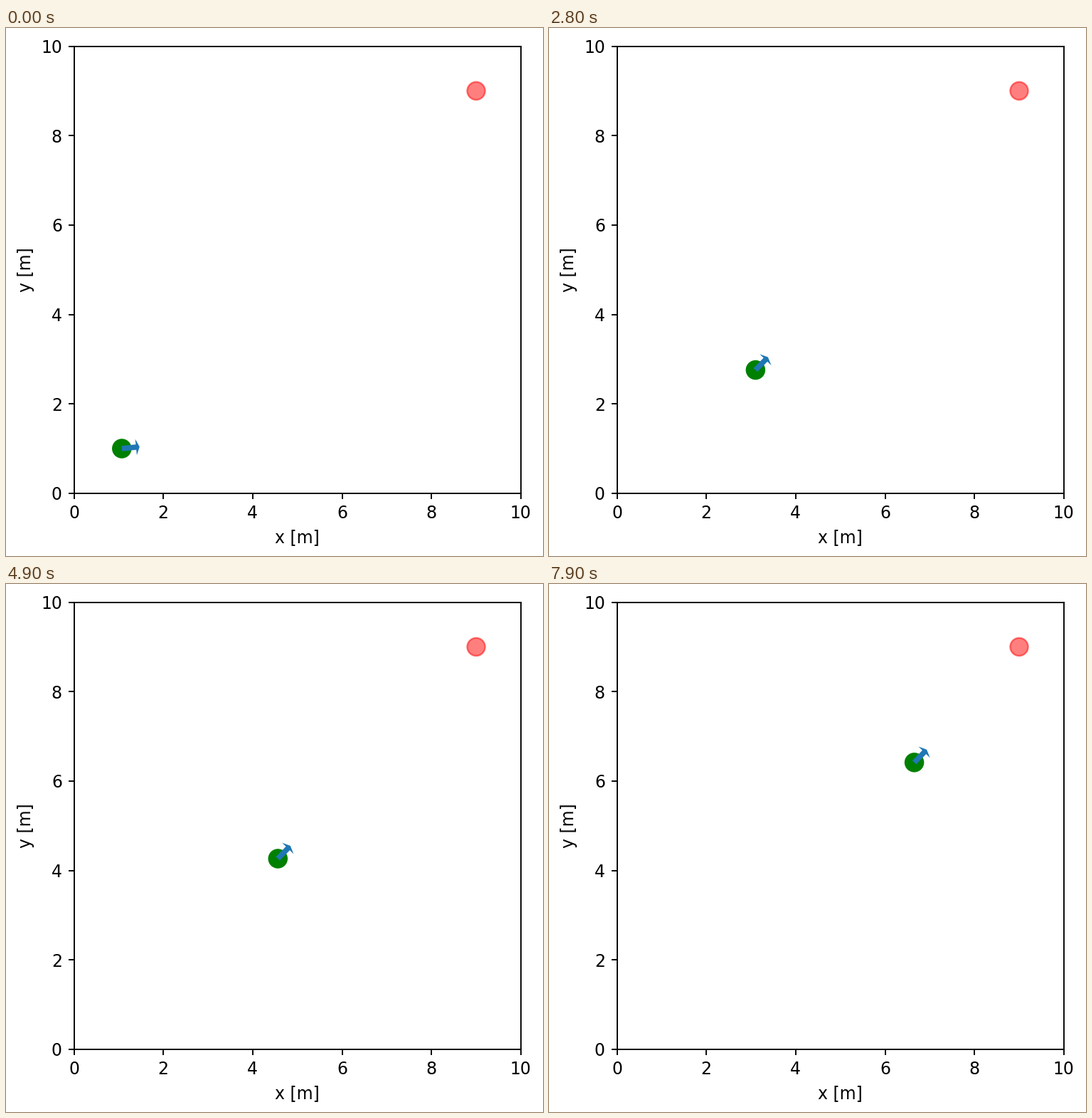
Recreate the animation shown at these times as a matplotlib script. Size 755 px wide and 742 px high, loop 8 s.

```python
import numpy as np
import matplotlib.pyplot as plt
from matplotlib.animation import FuncAnimation
from matplotlib.patches import Circle, Polygon

W, H, DPI = 755, 742, 170
LEFT, BOTTOM, SIDE = 95.52, 653.85, 628.32  # axes box in pixels from the top left
STEPS, DT = 80, 0.1
START, GOAL = (1.0, 1.0, 0.0), (9.0, 9.0)
MAX_V, MAX_W, ANGLE_TOL = 1.0, 1.0, 0.1
RADIUS = 0.2

# Unit arrow along +x, scaled to length 0.4 and width 0.6
ARROW = np.array([
    (0, 0.1), (0, -0.1), (0.8, -0.1), (0.8, -0.3),
    (1, 0), (0.8, 0.3), (0.8, 0.1),
]) * (0.4, 0.6)


def step(x, y, theta):
    """Differential drive robot dashing towards the goal."""
    diff = np.arctan2(GOAL[1] - y, GOAL[0] - x) - theta
    v = MAX_V * np.cos(diff)
    w = 0.0 if abs(diff) < ANGLE_TOL else MAX_W * np.sign(diff)
    return (x + v * np.cos(theta) * DT,
            y + v * np.sin(theta) * DT,
            theta + w * DT)


def simulate():
    states = [step(*START)]
    while len(states) < STEPS:
        states.append(step(*states[-1]))
    return states


def arrow_points(x, y, theta):
    c, s = np.cos(theta), np.sin(theta)
    return ARROW @ np.array([(c, s), (-s, c)]) + (x, y)


path = simulate()

plt.rcParams.update({"font.family": "DejaVu Sans", "font.size": 10})
fig = plt.figure(figsize=((W + 0.01) / DPI, (H + 0.01) / DPI), dpi=DPI,
                 facecolor="white")
ax = fig.add_axes([LEFT / W, (H - BOTTOM) / H, SIDE / W, SIDE / H])
ax.set(xlim=(0, 10), ylim=(0, 10), xlabel="x [m]", ylabel="y [m]")
ax.set_xticks(range(0, 11, 2))
ax.set_yticks(range(0, 11, 2))

goal = ax.add_patch(Circle(GOAL, RADIUS, color="red", alpha=0.5, zorder=1))
robot = ax.add_patch(Circle(path[0][:2], RADIUS, color="green", zorder=2))
arrow = ax.add_patch(Polygon(arrow_points(*path[0]), facecolor="C0",
                             edgecolor="none", linewidth=0, zorder=3))


def update(i):
    x, y, theta = path[i]
    robot.center = x, y
    arrow.set_xy(arrow_points(x, y, theta))
    return robot, arrow


anim = FuncAnimation(fig, update, frames=STEPS, interval=1000 * DT,
                     repeat=True, repeat_delay=0, blit=False)
plt.show()
```
